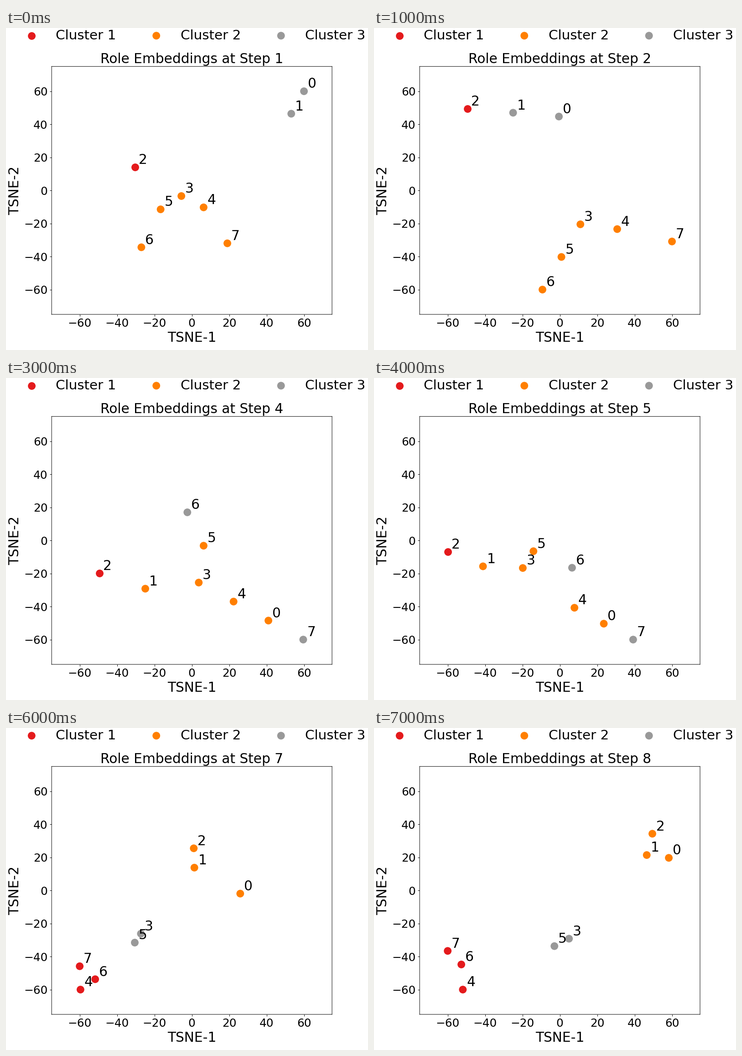
A matplotlib script for the animation above (8 s loop, 794 px wide and 706 px high).

```python
import numpy as np
import matplotlib.pyplot as plt
from matplotlib.animation import FuncAnimation

W, H = 794, 706
DPI = 72  # one point equals one pixel
SCALE = 1.225
BIG, SMALL, LEGEND = 29.65, 24.8, 24 * SCALE
COLORS = {"1": "#e41a1c", "2": "#ff7f00", "3": "#999999"}
EDGE = -60


def layout(clusters, **paths):
    """Spread the roles named by each key evenly along a curve through its points."""
    pos = np.zeros((8, 2))
    for name, points in paths.items():
        roles = [int(ch) for ch in name[1:]]
        curve = np.polyfit(np.linspace(0, 1, len(points)), points, len(points) - 1)
        t = np.linspace(0, 1, len(roles))[:, None]
        pos[roles] = np.polyval(curve, t)
    return clusters, pos


def between(a, b, mix):
    """Blend two layouts, then push the group to the left and bottom edge."""
    pos = (1 - mix) * a[1] + mix * b[1]
    return (a if mix < 0.5 else b)[0], pos - pos.min(axis=0) + EDGE


arch = layout("33122222",
              r65347=[(-27, -34.4), (-5.6, -3.4), (19, -32)],
              r10=[(53.2, 46.4), (60, 60)],
              r2=[(-30.5, 14)])
split = layout("33122222",
               r210=[(-49.5, 49.3), (-0.5, 44.7)],
               r653=[(-9.3, -60), (11, -20.5)],
               r47=[(30.7, -23.4), (60, -30.9)])
ladder = layout("22211133",
                r012=[(20, 33), (48.5, 60)],
                r345=[(-60, 15), (-43.1, 15.2), (-57.3, -5.3)],
                r67=[(1.9, -16.1), (4.5, 8.1)])
slope = layout("22122233",
               r21=[(-49.5, -19.9), (-24.9, -29.2)],
               r65=[(-2.4, 17), (6.3, -3.2)],
               r3407=[(3.7, -25.5), (59.6, -60)])
diagonal = layout("21132322",
                  r2135=[(-59.7, 28.5), (-28.7, 4.3)],
                  r4076=[(2.1, -30.5), (36, -51)])
corners = layout("22231311",
                 r012=[(58.3, 19.7), (46.5, 21.4), (49.5, 34.3)],
                 r53=[(-2.9, -33.7), (4.9, -29.2)],
                 r764=[(-60, -36.6), (-52.7, -44.8), (-51.9, -60)])

STEPS = [arch, split, ladder, slope, between(slope, diagonal, 0.4),
         diagonal, between(diagonal, corners, 0.75), corners]

plt.rcParams.update({
    "font.family": "DejaVu Sans",
    "axes.linewidth": 0.8 * SCALE,
    "axes.titlepad": 6 * SCALE,
    "axes.labelpad": 4 * SCALE,
})
for axis in ("xtick", "ytick"):
    plt.rcParams.update({
        f"{axis}.labelsize": SMALL,
        f"{axis}.major.size": 3.5 * SCALE,
        f"{axis}.major.pad": 3.5 * SCALE,
        f"{axis}.major.width": 0.8 * SCALE,
    })

fig = plt.figure(figsize=(W / DPI, H / DPI), dpi=DPI, facecolor="white")
ax = fig.add_axes([0.1261, 0.1106, 0.7745, 0.77])


def draw_step(i):
    clusters, pos = STEPS[i]
    ax.clear()
    for key, color in COLORS.items():
        group = pos[[c == key for c in clusters]]
        ax.scatter(*group.T, s=150 * SCALE ** 2, c=[color] * len(group),
                   linewidths=1.5 * SCALE, label=f"Cluster {key}")
    for role, (x, y) in enumerate(pos):
        ax.text(x + 2, y + 2, str(role), fontsize=BIG)

    ticks = range(-60, 61, 20)
    ax.set(xlim=(-75, 75), ylim=(-75, 75), xticks=ticks, yticks=ticks)
    for spine in ax.spines.values():
        spine.set_snap(False)
    ax.set_xlabel("TSNE-1", fontsize=BIG)
    ax.set_ylabel("TSNE-2", fontsize=BIG)
    ax.set_title(f"Role Embeddings at Step {i + 1}", fontsize=BIG)
    ax.legend(loc="upper center", bbox_to_anchor=(0.5, 1.199), ncol=3,
              fontsize=LEGEND, frameon=False)


anim = FuncAnimation(fig, draw_step, frames=len(STEPS), interval=1000,
                     repeat=True, repeat_delay=0)
plt.show()
```
